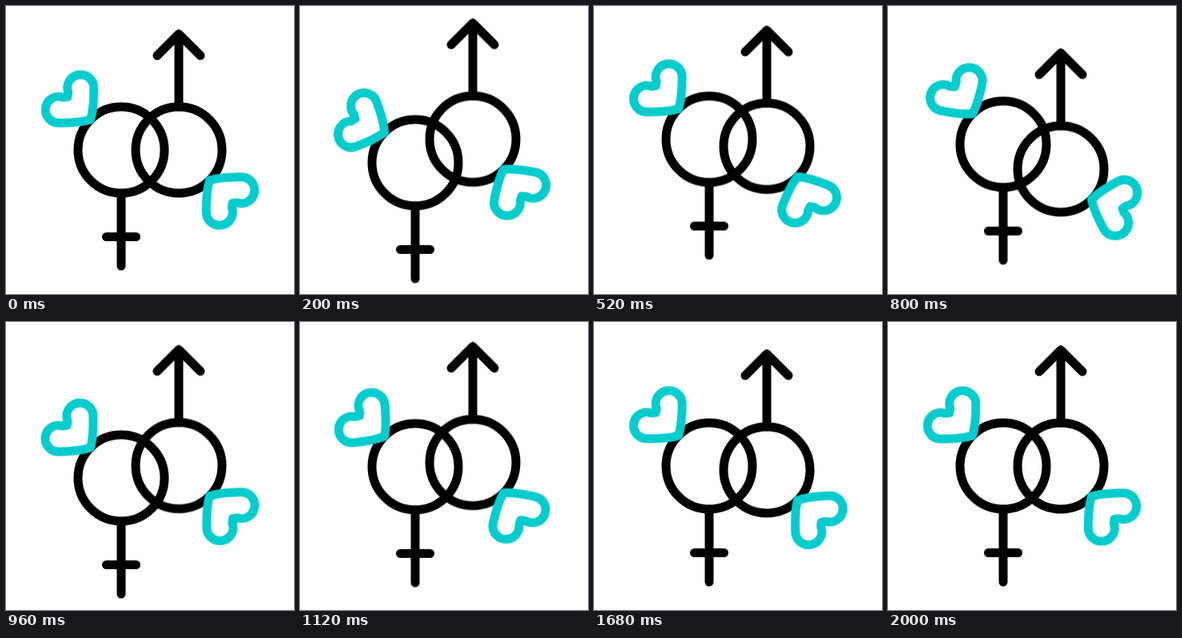
An HTML page for the animation above (2080 ms loop, 360 px wide and 360 px high).

```html
<!DOCTYPE html>
<html lang="en">
<head>
<meta charset="utf-8">
<title>Joined rings with hearts</title>
<style>
  html, body { margin: 0; width: 100%; height: 100%; overflow: hidden; background: #fff; }
  svg { display: block; width: 100vw; height: 100vh; }
  .line { fill: none; stroke: #000; stroke-width: 11; stroke-linecap: round; stroke-linejoin: round; }
  .heart { stroke: #02cccc; }

  /* Each part swings through a few decaying peaks, then rests. */
  .move { animation: 2080ms cubic-bezier(.333, 0, .667, 1) infinite; }
  .female { animation-name: female; }
  .male { animation-name: male; }
  .female-heart { animation-name: female-heart; }
  .male-heart { animation-name: male-heart; }

  @keyframes female {
    0% { transform: translateY(0); }
    15.38% { transform: translateY(23px); }
    30.77% { transform: translateY(-30px); }
    46.15% { transform: translateY(15px); }
    61.54% { transform: translateY(-13px); }
    77.88%, 100% { transform: translateY(0); }
  }
  @keyframes male {
    0% { transform: translateY(0); }
    16.35% { transform: translateY(-21.5px); }
    37.5% { transform: translateY(24.3px); }
    50% { transform: translateY(-7.5px); }
    67.31% { transform: translateY(16.4px); }
    88.46%, 100% { transform: translateY(0); }
  }
  @keyframes female-heart {
    0% { transform: rotate(0deg); }
    15.38% { transform: rotate(-30deg); }
    31.73% { transform: rotate(18deg); }
    51.92% { transform: rotate(-6deg); }
    67.31% { transform: rotate(4.5deg); }
    84.62%, 100% { transform: rotate(0deg); }
  }
  @keyframes male-heart {
    0% { transform: rotate(0deg); }
    22.12% { transform: rotate(27deg); }
    37.5% { transform: rotate(-29deg); }
    51.92% { transform: rotate(14deg); }
    67.31% { transform: rotate(-7.5deg); }
    88.46%, 100% { transform: rotate(0deg); }
  }
</style>
</head>
<body>
<svg viewBox="0 0 360 360">
  <defs>
    <!-- The heart's tip sits on the origin, so it turns about its tip. -->
    <path id="heart" d="M0 0C-12 -6 -24 -18 -31.3 -25.3A16.5 16.5 0 1 1 -4.6 -44L0 -40.5L4.6 -44A16.5 16.5 0 1 1 31.3 -25.3C24 -18 12 -6 0 0Z"/>
  </defs>

  <g class="move female">
    <g class="line">
      <circle cx="144" cy="180" r="54"/>
      <path d="M144 234V325M125.500 288.500H162.500"/>
    </g>
  </g>

  <g class="move male">
    <g class="line">
      <circle cx="216" cy="180" r="54"/>
      <path d="M216 126V35M189 62L216 35L243 62"/>
    </g>
  </g>

  <g class="move female">
    <g transform="translate(105.500 142) rotate(-45)">
      <g class="move female-heart"><use href="#heart" class="line heart"/></g>
    </g>
  </g>

  <g class="move male">
    <g transform="translate(254.500 218) rotate(135)">
      <g class="move male-heart"><use href="#heart" class="line heart"/></g>
    </g>
  </g>
</svg>
</body>
</html>
```
